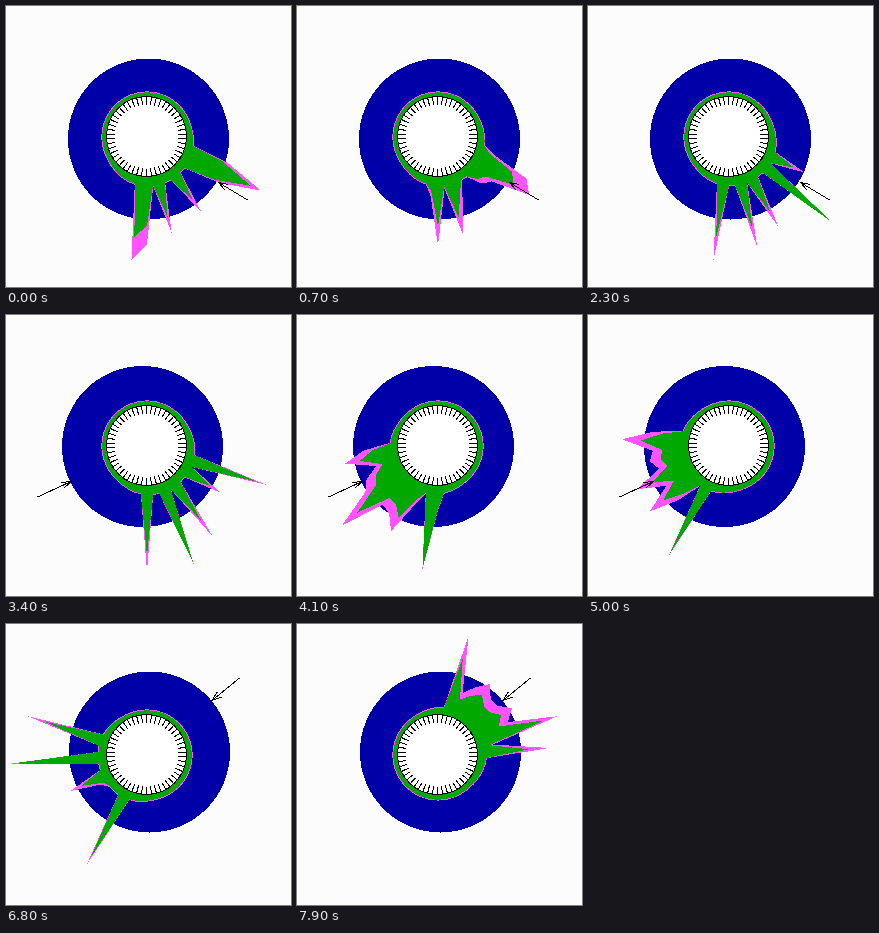
An HTML page that plays this animation: 285x281 px, repeating every 8000 ms.

```html
<!DOCTYPE html>
<html lang="en">
<head>
<meta charset="utf-8">
<title>Ring activity</title>
<style>
html, body { margin: 0; width: 100%; height: 100%; overflow: hidden; background: #fcfcfc; }
svg { display: block; shape-rendering: crispEdges; }
.line { fill: none; stroke: #000; }
</style>
</head>
<body>
<svg width="285" height="281">
  <circle id="disc" r="80.5" fill="#0000a8"/>
  <path id="pink" fill="#ff54ff"/>
  <path id="green" fill="#00a800"/>
  <circle cx="140.5" cy="130.5" r="40" fill="#fff" stroke="#000"/>
  <path id="ticks" class="line"/>
  <path id="arrow" class="line"/>
</svg>
<script>
const CELLS = 50, STEP = 100, LOOP = 8000;
const [disc, pink, green, ticks, arrow] =
  ['disc', 'pink', 'green', 'ticks', 'arrow'].map(id => document.getElementById(id));

// Stimulus: start time, disc centre, arrow tail and tip
const cues = [
  { from: 0, centre: [142.5, 133], tail: [242.5, 194.5], tip: [212.5, 176.5] },
  { from: 3100, centre: [136.5, 131.5], tail: [31.5, 182], tip: [65, 166.5] },
  { from: 6600, centre: [143.5, 128], tail: [233.5, 54], tip: [206, 76.5] }
];

// Activity moves through these: each spike is [cell, height, half-width = 1]
const keys = [
  { at: 0, spikes: [[3, 70, 2], [7, 33], [10, 38], [12, 44], [13, 56]] },
  { at: 1400, spikes: [[3, 83, 2], [6, 10], [9, 40], [10, 54], [12, 36]] },
  { at: 2300, spikes: [[3, 27], [5, 88], [8, 41], [10, 49], [13, 56]] },
  { at: 3400, spikes: [[2, 70], [4, 30], [7, 47], [9, 81], [12, 65]] },
  { at: 5000, spikes: [[16, 78], [19, 41, 2], [21, 40, 2], [23, 25, 2], [25, 44, 2]] },
  { at: 6800, spikes: [[16, 71], [20, 7], [21, 28], [24, 90], [27, 63]] },
  { at: 7900, spikes: [[39, 55], [42, 30, 4], [45, 30, 4], [47, 67], [49, 47]] }
];

const mix = (a, b, u) => a + (b - a) * u;
const noise = n => {
  const s = Math.sin(n * 12.9898) * 43758.5453;
  return s - Math.floor(s);
};
const polar = (x, y, r, a) => `${x + r * Math.cos(a)},${y + r * Math.sin(a)}`;
const cellAngle = k => (k + 0.5) / CELLS * 2 * Math.PI;
const ring = make => Array.from({ length: CELLS }, (_, k) => make(k));
const gap = (a, b) => Math.abs((a - b + 2.5 * CELLS) % CELLS - CELLS / 2);

// Spikes glide from key to key and flicker on the way
function spikesAt(t) {
  const i = keys.findLastIndex(key => t >= key.at);
  const now = keys[i], next = keys[i + 1] ?? now;
  const u = (t - now.at) / (next.at - now.at || 1);
  const eased = 1 - (1 - u) ** 3;
  const flicker = Math.sin(Math.PI * u);
  return now.spikes.map(([c0, h0, w0 = 1], n) => {
    const [c1, h1, w1 = 1] = next.spikes[n];
    const jitter = seed => (noise(t / STEP + seed + n * 101) - 0.5) * flicker;
    return {
      cell: mix(c0, c1, eased) + 2 * jitter(7),
      height: mix(h0, h1, eased) * (1 + jitter(53)),
      width: mix(w0, w1, eased)
    };
  });
}

function star(spikes, base, grow) {
  const middle = spikes.reduce((sum, s) => sum + s.cell, 0) / spikes.length;
  return 'M' + ring(k => {
    const swell = 4 * Math.exp(-((gap(k, middle) / 9) ** 4));
    const peak = Math.max(swell, ...spikes.map(s =>
      grow(s.height) * (1 - gap(k, s.cell) / s.width)));
    return polar(141, 131, base + peak, cellAngle(k));
  }).join('L') + 'Z';
}

function arrowPath([x0, y0], [x1, y1]) {
  const back = Math.atan2(y0 - y1, x0 - x1);
  const barb = turn => polar(x1, y1, 10, back + turn);
  return `M${x0},${y0}L${x1},${y1}M${barb(-0.33)}L${x1},${y1}L${barb(0.33)}`;
}

ticks.setAttribute('d', ring(k => {
  const end = r => polar(140.5, 130.5, r, cellAngle(k));
  return `M${end(32)}L${end(40)}`;
}).join(''));

function draw(now) {
  const t = Math.floor(now % LOOP / STEP) * STEP;
  const cue = cues.findLast(c => t >= c.from);
  const spikes = spikesAt(t);
  disc.setAttribute('cx', cue.centre[0]);
  disc.setAttribute('cy', cue.centre[1]);
  // Pink overshoots green until it saturates
  pink.setAttribute('d', star(spikes, 45.6, h => Math.max(h, Math.min(1.4 * h, 80))));
  green.setAttribute('d', star(spikes, 44.7, h => h));
  arrow.setAttribute('d', arrowPath(cue.tail, cue.tip));
  requestAnimationFrame(draw);
}
requestAnimationFrame(draw);
</script>
</body>
</html>
```
